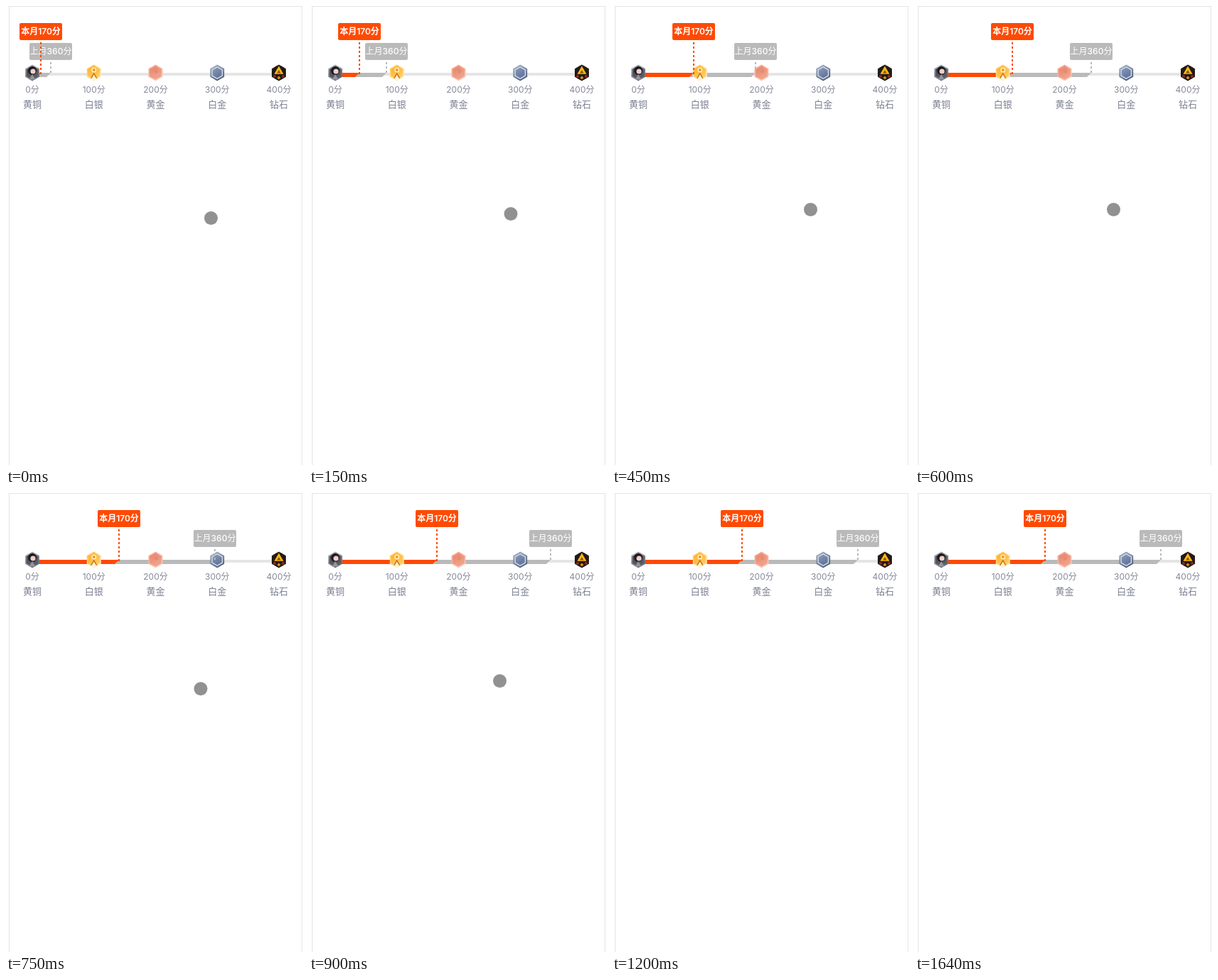
Recreate the animation shown at these times as an HTML page with a canvas. Size 418x646 px, loop 2130 ms.

```html
<!DOCTYPE html>
<html lang="zh">
<head>
<meta charset="utf-8">
<title>积分进度</title>
<style>
html, body { margin: 0; width: 100%; height: 100%; overflow: hidden; background: #fff; }
canvas { display: block; }
</style>
</head>
<body>
<canvas id="stage" width="418" height="646"></canvas>
<script>
const ctx = document.getElementById('stage').getContext('2d');
const LOOP = 2130, STEP = 150;
const FONT = 'Inter, "Noto Sans CJK SC", "Noto Sans CJK", sans-serif';
const ORANGE = '#ff4a03', GREY = '#bababa', TRACK = '#e5e5e5', POINTER = '#919191';
const BAR_X = 37, BAR_Y = 94, GAP = 86.75;
const FLAG_W = 60, FLAG_H = 24;

// Pointer: drifts to a rest, moves on, then drops out of the stage
const START = { x: 288.5, y: 298.5 };
const REST = { x: 279.5, y: 286.5 };
const LIFT = { x: 268.5, y: 264.5 };
const DROP = { x: 320.5, y: 586.5 };
const EXIT = { x: 351.5, y: 652.5 };

const mix = (a, b, k) => ({ x: a.x + (b.x - a.x) * k, y: a.y + (b.y - a.y) * k });

function pointerAt(t) {
  const step = Math.floor(t / STEP);
  if (step < 4) return mix(START, REST, Math.min(1, step / 2));
  if (step < 7) return mix(REST, LIFT, (step - 4) / 2);
  if (step < 8) return DROP;
  return t >= 1490 && t < 1640 ? EXIT : null;
}

function disc(x, y, r, color) {
  ctx.fillStyle = color;
  ctx.beginPath();
  ctx.arc(x, y, r, 0, Math.PI * 2);
  ctx.fill();
}

// Regular polygon with one corner at the top
function ngon(sides, r, color, y = 0) {
  ctx.fillStyle = color;
  ctx.beginPath();
  for (let i = 0; i < sides; i++) {
    const a = i / sides * Math.PI * 2;
    ctx.lineTo(r * Math.sin(a), y - r * Math.cos(a));
  }
  ctx.fill();
}

function fade(from, to) {
  const g = ctx.createLinearGradient(-6, -10, 6, 10);
  g.addColorStop(0, from);
  g.addColorStop(1, to);
  return g;
}

function portrait() {
  disc(0, -3, 6, '#1e1a22');
  disc(1, -2, 3.6, '#f0cfc6');
  ngon(3, 5, '#92969f', 7);
}

function medal() {
  disc(0, -4, 3.5, '#ffedb8');
  disc(0, -4, 1.8, '#f08a10');
  ngon(3, 5.5, '#c8740f', 5);
  ngon(3, 5, '#fff3d8', 7.5);
}

function gem() {
  ngon(6, 6.5, fade('#e48068', '#f4ae98'), -1);
  disc(1, -2, 2.5, '#e58a74');
}

function shield() {
  ngon(6, 9, '#dbe2ec');
  ngon(6, 7.5, fade('#8d9fbd', '#566a92'));
}

function crest() {
  disc(0, 0, 10, '#211a18');
  disc(-6, 5, 2, '#8f2a1c');
  disc(6, 5, 2, '#8f2a1c');
  ngon(3, 7.5, '#ffb915', -2);
  ngon(3, 3, '#8a4f08', -1);
  ngon(4, 2.5, '#d98d18', 7);
}

const LEVELS = [
  { name: '黄铜', rim: ['#a9adb5', '#666a73'], core: ['#4a4852', '#5d616b'], emblem: portrait },
  { name: '白银', rim: ['#ffc24a', '#fff0cf'], core: ['#ffad2c', '#ffd36e'], emblem: medal },
  { name: '黄金', rim: ['#f3a58d', '#f8cdbd'], core: ['#ea866b', '#f3a891'], emblem: gem },
  { name: '白金', rim: ['#a3b0c4', '#4e5d7b'], core: ['#8d9db6', '#5c6c8c'], emblem: shield },
  { name: '钻石', rim: ['#2e2420', '#1b1513'], core: ['#211a18', '#211a18'], emblem: crest }
];

function text(str, x, y, size, weight, color) {
  ctx.font = `${weight} ${size}px ${FONT}`;
  ctx.textAlign = 'center';
  ctx.fillStyle = color;
  ctx.fillText(str, x, y);
}

function drawLevel({ name, rim, core, emblem }, i) {
  const x = BAR_X + GAP * i;
  ctx.save();
  ctx.translate(x, BAR_Y);
  ngon(6, 11.5, fade(...rim));
  ngon(6, 9.5, fade(...core));
  emblem();
  ctx.restore();
  text(`${i * 100}分`, x, 122.4, 12, 400, '#85889a');
  text(name, x, 142.8, 13, 400, '#7b7f92');
}

function bar(tip, color) {
  ctx.fillStyle = color;
  ctx.beginPath();
  ctx.moveTo(BAR_X, BAR_Y);
  ctx.lineTo(tip, BAR_Y);
  ctx.lineTo(tip - 6, BAR_Y + 6);
  ctx.lineTo(BAR_X, BAR_Y + 6);
  ctx.fill();
}

function flag(x, top, label, weight, color) {
  ctx.fillStyle = color;
  for (let y = top + 27; y < BAR_Y; y += 6) ctx.fillRect(x - 1, y, 2, 3);
  ctx.beginPath();
  ctx.roundRect(x - FLAG_W / 2, top, FLAG_W, FLAG_H, 2);
  ctx.fill();
  text(label, x, top + 16.4, 12, weight, '#fff');
}

function draw(t) {
  const step = Math.floor(t / STEP);
  const now = Math.min(183, Math.round(49 + 21.9 * step));
  const last = Math.min(346, Math.round(63 + 46.2 * step));

  ctx.fillStyle = '#fff';
  ctx.fillRect(0, 0, 418, 646);
  ctx.strokeStyle = '#e4e4e4';
  ctx.strokeRect(4.5, 0.5, 412, 660);

  ctx.fillStyle = TRACK;
  ctx.fillRect(BAR_X, BAR_Y, GAP * 4, 4);
  bar(last, GREY);
  bar(now, ORANGE);
  LEVELS.forEach(drawLevel);

  flag(last, 52, '上月360分', 500, GREY);
  flag(now, 24, '本月170分', 600, ORANGE);

  const p = pointerAt(t);
  if (p) disc(p.x, p.y, 9.5, POINTER);
}

const start = performance.now();
function tick() {
  draw((performance.now() - start) % LOOP);
  requestAnimationFrame(tick);
}
tick();
</script>
</body>
</html>
```
